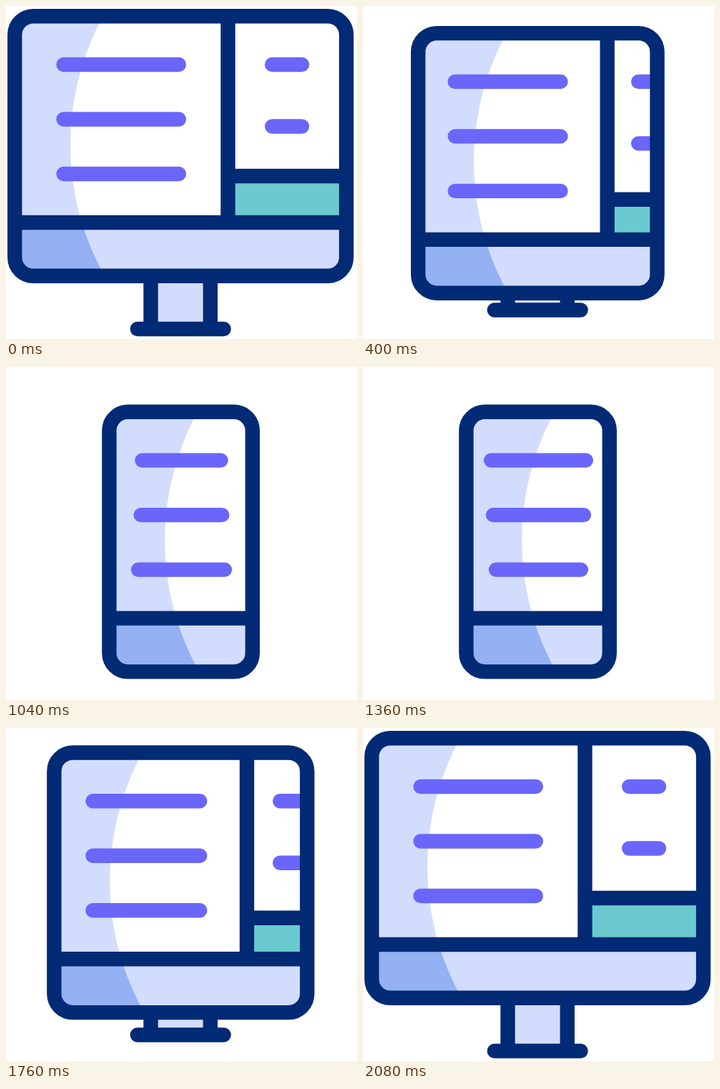
An HTML page for the animation above (2120 ms loop, 491x466 px).

```html
<!DOCTYPE html>
<html lang="en">
<head>
<meta charset="utf-8">
<title>Responsive screen</title>
<style>
  html, body { margin: 0; width: 100%; height: 100%; overflow: hidden; background: #fff; }
  svg { display: block; width: 491px; height: 466px; }
  .navy { stroke: #032a74; stroke-width: 20.4; fill: none; }
  .text { stroke: #6a66fa; stroke-width: 20.4; stroke-linecap: round; }
</style>
</head>
<body>
<svg viewBox="0 0 491 466">
  <defs>
    <clipPath id="screen"><rect id="screenShape" height="364" rx="26"/></clipPath>
    <clipPath id="shade"><circle id="shadeShape" r="377" cy="190"/></clipPath>
  </defs>
  <g id="stand">
    <rect x="203" y="-90" width="83" height="90" fill="#d2dcfd"/>
    <path class="navy" d="M202.5 -90V0M285.8 -90V0"/>
    <path class="navy" d="M183.8 0H304.6" stroke-linecap="round"/>
  </g>
  <g id="device">
    <g clip-path="url(#screen)">
      <rect width="491" height="384" fill="#d2dcfd"/>
      <rect y="299" width="491" height="85" fill="#93b1f3"/>
      <g clip-path="url(#shade)">
        <rect width="491" height="299" fill="#fff"/>
        <rect y="299" width="491" height="85" fill="#d2dcfd"/>
      </g>
      <rect id="panel" width="200" fill="#6acacf"/>
      <path id="dividers" class="navy"/>
      <path id="longLines" class="text"/>
      <path id="shortLines" class="text"/>
    </g>
    <rect id="frame" class="navy" y="10.2" height="363.6" rx="26"/>
  </g>
</svg>
<script>
const LOOP = 2120, STEP = 40;
const $ = id => document.getElementById(id);
const set = (id, attrs) => {
  for (const name in attrs) $(id).setAttribute(name, attrs[name]);
};
const clamp = u => Math.min(1, Math.max(0, u));
const ease = u => u < .5 ? 4 * u ** 3 : 1 - 4 * (1 - u) ** 3;
const span = (t, start, length) => clamp((t - start) / length);

// Path of a round-capped bar given its outer ends
const bar = (left, right, y) => `M${left + 10.2} ${y}H${right - 10.2}`;

// Each text line narrows and recovers, one after the other
function lineScale(t, index) {
  const u = span(t, 690 + index * 80, 720);
  return 1 - .077 * (1 - Math.cos(2 * Math.PI * u));
}

function draw(t) {
  // 0 is the wide monitor, 1 the phone
  const p = ease(span(t, 56, 692)) - ease(span(t, 1416, 650));
  const left = 2 + 132.2 * p;
  const width = 484.3 - 263.5 * p;

  set('stand', { transform: `translate(0 ${452 - 54 * p})` });
  set('device', { transform: `translate(0 ${4 + 48.6 * p})` });
  set('frame', { x: left + 10.2, width: width - 20.4 });
  set('screenShape', { x: left + 10, y: 10, width: width - 20 });
  set('shadeShape', { cx: left + 88 + 377 });

  const divider = 310.5 + 63.5 * p;
  const shelf = 234 + 18 * p;
  set('panel', { x: divider, y: shelf, height: 299 - shelf });
  set('dividers', { d: `M0 299H491M${divider} 0V299M${divider} ${shelf}H491` });

  const from = 70.3 + 98 * p, to = 252 + 70.6 * p;
  const middle = (from + to) / 2;
  set('longLines', {
    d: [78, 154.5, 231].map((y, i) => {
      const half = (to - from) / 2 * lineScale(t, i);
      return bar(middle - half, middle + half, y);
    }).join('')
  });
  set('shortLines', {
    d: [78, 164.5].map(y => bar(362 + 26.5 * p, 424.2 - 4 * p, y)).join('')
  });
}

const began = performance.now();
function tick() {
  const t = (performance.now() - began) % LOOP;
  draw(Math.floor(t / STEP) * STEP);
  requestAnimationFrame(tick);
}
tick();
</script>
</body>
</html>
```
